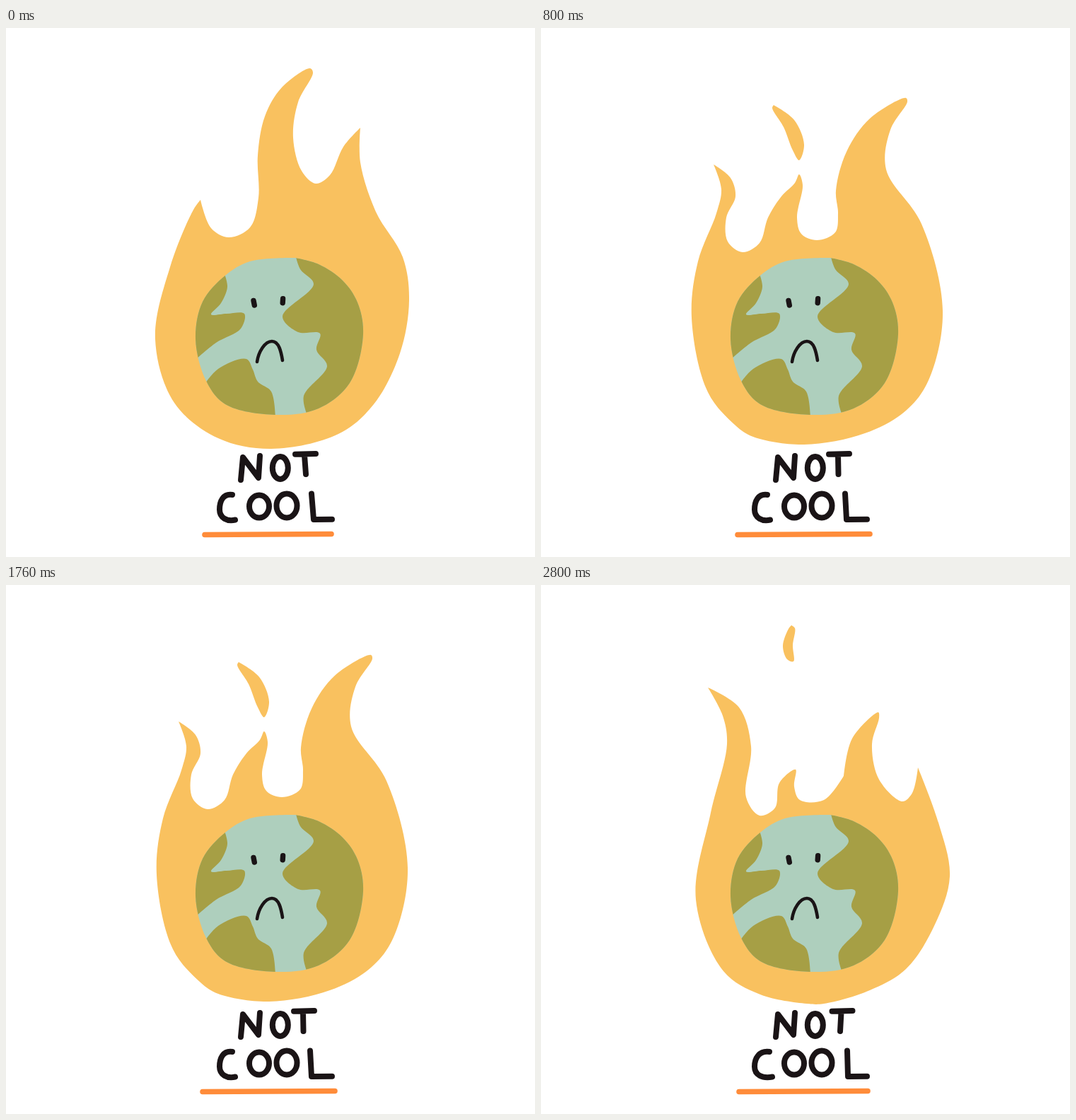
An HTML page for the animation above (2880 ms loop, 748 by 748 pixels).

```html
<!DOCTYPE html>
<html lang="en">
<head>
<meta charset="utf-8">
<title>Not cool</title>
<style>
  html, body { margin: 0; width: 100%; height: 100%; overflow: hidden; background: #fff; }
  svg { display: block; width: 100vw; height: 100vh; }
  .ink { fill: none; stroke: #1a1416; stroke-linecap: round; stroke-linejoin: round; }
</style>
</head>
<body>
<svg viewBox="0 0 748 748" role="img" aria-label="NOT COOL">
  <clipPath id="globe"><path id="clip"/></clipPath>
  <path id="flame" fill="#f9c15f"/>
  <path id="sea" fill="#aecfbd"/>
  <path id="land" fill="#a69f45" clip-path="url(#globe)"/>
  <path id="open" class="ink" stroke-width="7.4" d="M350 385.5l1.3 6.5M391.6 382.7l-.4 6"/>
  <path id="droopy" fill="#1a1416" d="M346 387l7-5 2 10q-1 4-5 4-3-1-3-5zM388 381l8 5-1 5q-4 3-7-1z"/>
  <path class="ink" stroke-width="4.6" d="M355 472C357 458 366 443 376 443S389 458 391 470"/>
  <path id="words" class="ink" stroke-width="8"/>
  <path id="line" fill="none" stroke="#ff8c3a" stroke-width="7.6" stroke-linecap="round"/>
</svg>
<script>
  const STEP = 80, LOOP = 2880;
  const $ = id => document.getElementById(id);
  const set = (id, d) => $(id).setAttribute("d", d);
  const show = (id, on) => $(id).setAttribute("visibility", on ? "visible" : "hidden");

  // Bezier handle at b, aiming from b towards c, for a centripetal spline
  function handle(a, b, c) {
    const m = Math.hypot(b[0] - a[0], b[1] - a[1]), n = Math.hypot(c[0] - b[0], c[1] - b[1]);
    if (!m || !n) return b;
    const r = Math.sqrt(m * n);
    return [0, 1].map(i => (m * c[i] - n * a[i] + (2 * m + 3 * r + n) * b[i]) / (3 * (m + r)));
  }

  // Smooth closed outline through points; "/" marks a sharp corner
  function blob(text) {
    let last, path = "";
    for (const part of text.split("/")) {
      const run = part.trim().split(" ").map(p => p.split(",").map(Number));
      if (last) run.unshift(last); else path = "M" + run[0];
      for (let i = 0; i < run.length - 1; i++) {
        const p = run[i], q = run[i + 1];
        path += "C" + [handle(run[i - 1] || p, p, q), handle(run[i + 2] || q, q, p), q].join(" ");
      }
      last = run[run.length - 1];
    }
    return path + "Z";
  }

  const ring = (x, y, rx, ry) =>
    `M${x - rx} ${y}a${rx} ${ry} 0 1 1 ${2 * rx} 0a${rx} ${ry} 0 1 1 ${-2 * rx} 0`;

  // tee, foot: top and bottom of T; ell, heel: top and corner of L; cee: shift of C
  const words = (tee, foot, ell, heel, cee) =>
    "M332 639L335 607 357 636 359 605" + ring(387.8, 622, 11, 16) +
    `M${tee - 14} 602.7L${tee + 15} 602M${tee - 1} 604L${foot} 631` +
    `M${320 + cee} 660C${307 + cee / 2} 658 302 669 302 681S313 698 ${324 + cee} 695.5` +
    ring(358, 676.5, 14, 16) + ring(397, 675.5, 14.5, 17) +
    `M${ell} 658.5L${heel} 695 461 694.7`;

  const line = (from, to) => `M${from} 716.5L${to} 715.5`;

  const tall = blob("275,243 / 290,283 315,296 345,282 357,240 356,180 366,125 390,84 430,57 434,63 413,105 406,155 418,202 438,220 458,208 477,168 501,141 / 501,190 523,260 561,324 570,385 557,460 520,532 470,574 375,595 300,580 238,530 211,440 232,338 265,257 275,243");

  const leaning = blob("258,218 / 272,250 277,290 300,307 332,290 345,248 360,190 358,130 366,78 374,78 391,130 386,195 391,243 414,262 437,240 458,165 508,118 511,122 493,180 516,248 553,312 569,395 530,518 434,584 374,592 258,550 212,422 248,273 258,218");

  const pinched = blob("244,193 / 268,212 275,238 262,268 264,302 285,317 309,304 321,268 340,238 359,219 365,207 370,222 362,268 368,291 390,300 416,289 420,262 417,230 432,175 465,128 516,99 518,104 494,144 488,200 538,277 568,400 548,498 516,541 458,573 372,589 300,578 275,562 236,515 213,410 222,330 248,262 255,228 244,193");
  const bigDrop = blob("329,109 / 358,130 372,165 365,187 356,173 343,140 327,113 329,109");

  const low = blob("236,145 / 280,173 297,228 290,300 309,326 331,315 337,280 360,261 358,285 366,304 400,304 428,270 / 440,217 477,180 478,188 468,225 478,275 511,306 525,294 533,258 / 562,336 578,412 556,482 516,543 465,573 400,592 376,592 310,579 258,546 219,445 240,322 263,225 257,185 236,145");
  const smallDrop = blob("354,57 359,61 356,85 357,108 348,105 342,86 350,62 354,57");

  const poses = [
    { flame: tall, words: words(423, 424, 432, 435, 0), line: line(281, 460) },
    { flame: leaning, words: words(423, 422, 431, 434, 0), line: line(280, 462) },
    { flame: pinched + bigDrop, words: words(421, 420.5, 430, 432, 0), line: line(278, 465) },
    { flame: low + smallDrop, words: words(425.5, 423, 433, 434, 3), line: line(280, 462) }
  ];

  const ball = blob("409,325 442,334 476,357 497,388 505,433 486,502 442,538 381,547 310,532 283,499 268,440 278,387 310,350 345,330 409,325");
  set("clip", ball);
  set("sea", ball);
  set("land",
    blob("409,320 416,341 435,362 391,408 413,430 444,432 439,455 454,478 421,520 425,545 / 520,560 / 520,310 / 409,320") +
    blob("308,345 313,366 304,389 290,405 312,404 337,404 332,425 297,445 268,469 / 250,350 / 308,345") +
    blob("275,512 300,482 340,468 349,483 356,500 375,514 381,555 / 270,560 / 275,512"));

  const start = performance.now();

  function draw(now) {
    const t = Math.max(0, now - start) % LOOP;
    const pose = poses[Math.floor(t / STEP) % poses.length];
    for (const id in pose) set(id, pose[id]);
    const sad = t >= 960 && t < 1280;
    show("droopy", sad);
    show("open", !sad);
    requestAnimationFrame(draw);
  }
  draw(start);
</script>
</body>
</html>
```
